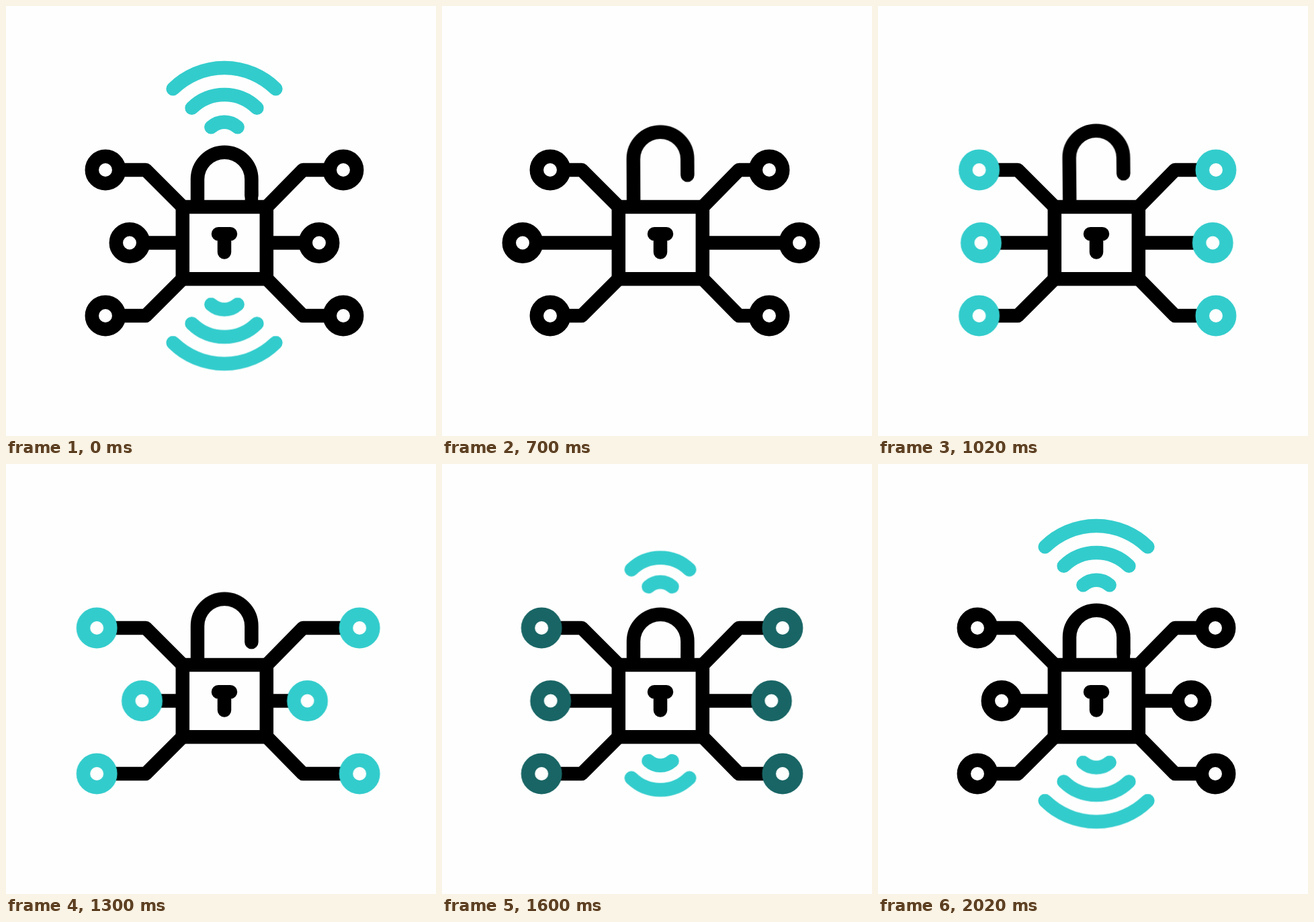
These frames come from a looping animation (640x640 px, 2.4 s). An HTML page:

```html
<!DOCTYPE html>
<html lang="en">
<head>
<meta charset="utf-8">
<title>Network lock</title>
<style>
  html, body { margin: 0; width: 100%; height: 100%; overflow: hidden; background: #fefefe; }
  svg { display: block; width: 100%; height: 100%; }

  svg { fill: none; stroke: #000; stroke-width: 20.5; stroke-linejoin: round; }
  .round { stroke-linecap: round; }
  .white { fill: #fefefe; }

  .node, .ring, .shackle, .latch, .waves, .arc { animation: 2400ms linear infinite; }
  .node { animation-name: slide; }
  .ring { animation-name: tint; fill: #fefefe; }
  .shackle { animation-name: lift; transform-origin: 285px 295px; }
  .latch { animation-name: latch; stroke-width: 19.5; }
  .waves { animation-name: grow; }
  .arc { stroke: #3cc; stroke-linecap: round; vector-effect: non-scaling-stroke; }
  .near { animation-name: near; }
  .mid { animation-name: mid; }
  .far { animation-name: far; }

  /* each node's three turning points */
  .lc { --a: 13px; --b: -13px; --c: 1.9px; }
  .rc { --a: -15px; --b: 24.5px; --c: 2.2px; }
  .lm { --a: -64px; --b: 19px; --c: -27.9px; }
  .rm { --a: 66px; --b: -18px; --c: 30px; }

  @keyframes slide {
    0%, 4.33% { transform: translateX(0); }
    29.17% { transform: translateX(var(--a)); }
    32.5% { transform: translateX(var(--a)); animation-timing-function: cubic-bezier(.37, 0, .63, 1); }
    55.42% { transform: translateX(var(--b)); animation-timing-function: cubic-bezier(.37, 0, .63, 1); }
    70% { transform: translateX(var(--c)); animation-timing-function: cubic-bezier(.37, 0, .63, 1); }
    83.75%, 100% { transform: translateX(0); }
  }
  @keyframes tint {
    0%, 31.5% { stroke: #000; }
    40%, 60% { stroke: #3cc; }
    73.33%, 100% { stroke: #000; }
  }
  @keyframes lift {
    0%, 4.5% { transform: translateY(0) rotate(0deg); }
    13% { transform: translateY(-27.8px) rotate(0deg); }
    45.83% { transform: translateY(-32.2px) rotate(-.6deg); }
    54.17% { transform: translateY(-17px) rotate(0deg); }
    67% { transform: translateY(6.6px) rotate(0deg); }
    83.75%, 100% { transform: translateY(0) rotate(0deg); }
  }
  @keyframes latch {
    0%, 4.5% { opacity: 1; }
    4.51%, 62.9% { opacity: 0; }
    63%, 100% { opacity: 1; }
  }
  @keyframes grow {
    0%, 58.32% { transform: scale(1); }
    58.33% { transform: scale(.01); animation-timing-function: cubic-bezier(.33, .67, .67, 1); }
    70.83%, 100% { transform: scale(1); }
  }
  @keyframes near {
    0%, 4.58% { transform: translateY(0) scale(1); }
    0%, 10.83% { opacity: 1; }
    19.17%, 60% { opacity: 0; }
    19.17%, 58% { transform: translateY(-98px) scale(1.18); }
    58.01%, 100% { transform: translateY(0) scale(1); }
    62.5%, 100% { opacity: 1; }
  }
  @keyframes mid {
    0%, 4.58% { transform: translateY(0) scale(1); }
    0%, 7.5% { opacity: 1; }
    13.75%, 62.5% { opacity: 0; }
    13.75%, 58% { transform: translateY(-62px) scale(1.05); }
    58.01%, 100% { transform: translateY(0) scale(1); }
    65%, 100% { opacity: 1; }
  }
  @keyframes far {
    0%, 4.58% { transform: translateY(0); opacity: 1; }
    9.38%, 58% { transform: translateY(-27px); }
    9.38%, 67% { opacity: 0; }
    58.01%, 100% { transform: translateY(0); }
    69.5%, 100% { opacity: 1; }
  }
</style>
</head>
<body>
<svg viewBox="0 0 640 640">
  <g transform="translate(325 201)">
    <g class="waves">
      <path class="arc far" d="M-76.4-77.7A109 109 0 0 1 76.4-77.7"/>
      <path class="arc mid" d="M-48.4-49.2A69 69 0 0 1 48.4-49.2"/>
      <path class="arc near" d="M-19.6-20.7A29 29 0 0 1 19.6-20.7"/>
    </g>
  </g>
  <g transform="translate(325 423.5) scale(1 -1)">
    <g class="waves">
      <path class="arc far" d="M-76.4-77.7A109 109 0 0 1 76.4-77.7"/>
      <path class="arc mid" d="M-48.4-49.2A69 69 0 0 1 48.4-49.2"/>
      <path class="arc near" d="M-19.6-20.7A29 29 0 0 1 19.6-20.7"/>
    </g>
  </g>

  <!-- fixed corner wires -->
  <path d="M155 244H208L263 299M505 244H442L388 299M155 461H208L263 406M505 461H442L388 406"/>

  <g class="node lm"><path d="M184 352.5h140"/><circle class="ring" cx="184" cy="352.5" r="20.2"/></g>
  <g class="node rm"><path d="M466 352.5h-140"/><circle class="ring" cx="466" cy="352.5" r="20.2"/></g>
  <g class="node lc"><circle class="ring" cx="148" cy="244" r="20.2"/><circle class="ring" cx="148" cy="461" r="20.2"/></g>
  <g class="node rc"><circle class="ring" cx="502" cy="244" r="20.2"/><circle class="ring" cx="502" cy="461" r="20.2"/></g>

  <g class="shackle">
    <path class="round" d="M285 340V258A40 40 0 0 1 365.4 258V282"/>
    <path class="latch" d="M365.4 275V298"/>
  </g>

  <rect class="white" x="262.8" y="299" width="125" height="107.2"/>
  <path class="round" d="M316 339.3H334M325 339.3V366.5"/>
</svg>
</body>
</html>
```
